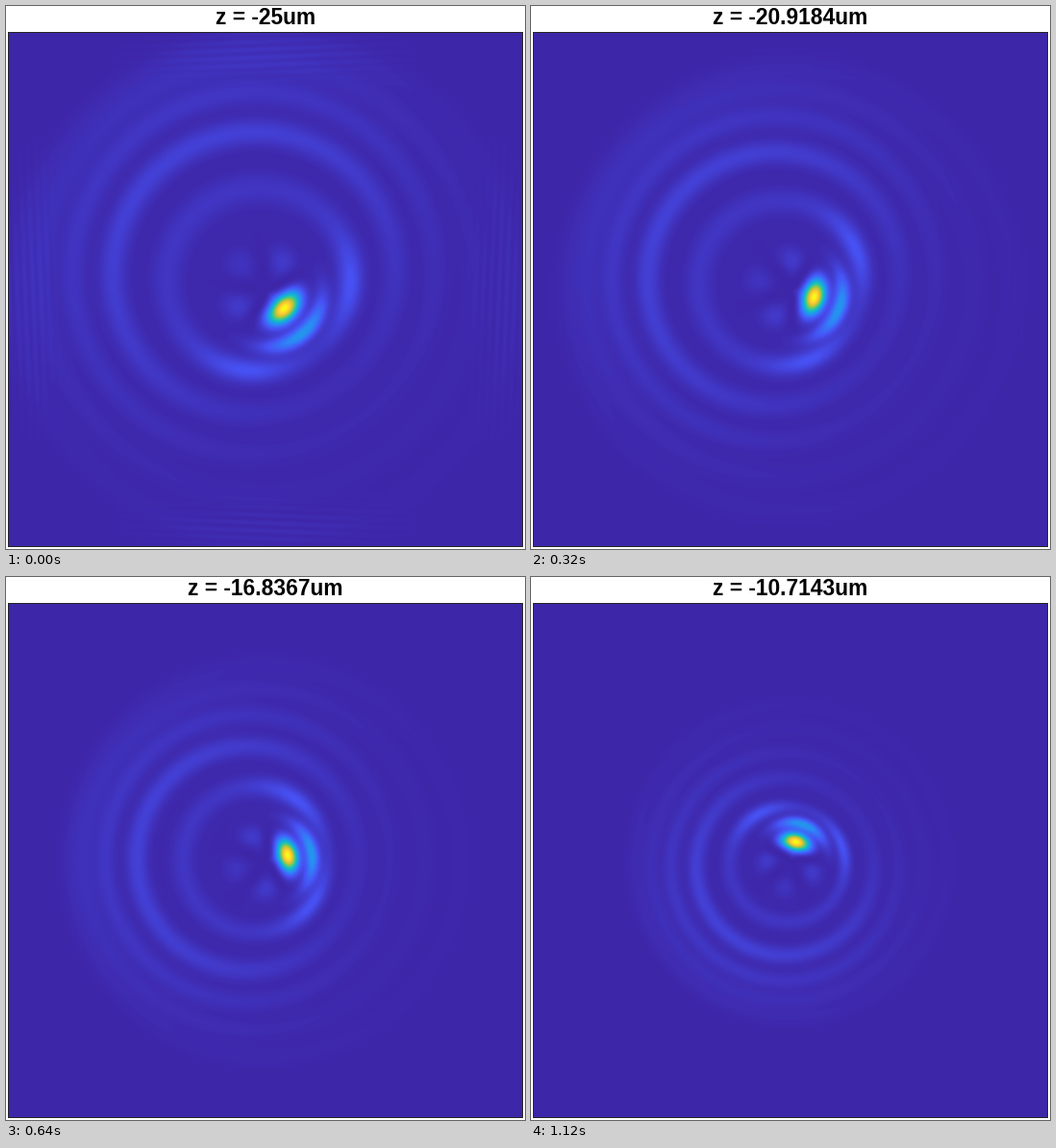
Recreate the animation shown at these times as a matplotlib script. Size 540 px wide and 565 px high, loop 1200 ms.

```python
import numpy as np
import matplotlib.pyplot as plt
from matplotlib.animation import FuncAnimation
from matplotlib.colors import LinearSegmentedColormap
from matplotlib.patches import Rectangle

W, H, DPI = 540, 565, 100
FRAMES, STEP_MS = 15, 80
LEFT, TOP, SIDE = 3, 28, 534
CHARGES = 5
RINGS = 5

PARULA = LinearSegmentedColormap.from_list("parula", [
    (.2422, .1504, .6603), (.2810, .3228, .9579), (.1786, .5289, .9682),
    (.0689, .6948, .8394), (.2161, .7843, .5923), (.6720, .7793, .2227),
    (.9970, .7659, .2199), (.9769, .9839, .0805)])

# Offsets from the optical axis, Y up
px, py = np.meshgrid(np.arange(SIDE) + LEFT, np.arange(SIDE) + TOP)
X, Y = px - 270, 295 - py
R, PHI = np.hypot(X, Y), np.arctan2(Y, X)


def bell(d, sigma):
    return np.exp(-0.5 * (d / sigma) ** 2)


def mix(a, b, t):
    return a + (b - a) * t


def angle_from(a):
    return (PHI - a + np.pi) % (2 * np.pi) - np.pi


def vortex_sum(phi):
    """Intensity around the axis of equal waves with consecutive charges."""
    waves = sum(np.exp(1j * n * phi) for n in range(CHARGES))
    return np.abs(waves / CHARGES) ** 2


def edge_fringes(k):
    """Faint wrap-around stripes along the four borders."""
    out = np.zeros(R.shape)
    for across, along in ((X, Y), (Y, X)):
        depth = SIDE / 2 - np.abs(across)
        wave = np.cos(np.pi * (depth + .04 * along) / 8.2) ** 2
        out += wave * bell(depth - 22, 17) * bell(along, 80)
    return .022 * bell(k, 1.9) * out


def intensity(k):
    t = k / (FRAMES - 1)
    turn = np.radians(mix(-45, 76, .8 * t + .2 * t ** 3))
    phi = angle_from(turn)

    # Main lobe with its weak side petals
    spread = 1 + .18 * (1 - np.cos(phi))
    img = vortex_sum(phi) * bell(R - mix(27, 20.5, t) * spread,
                                 mix(8.4, 6.2, t) * spread)

    # Crescent outside the lobe
    arc = np.degrees(angle_from(turn - np.radians(5)))
    img += .33 * bell(R - mix(59, 40, t), mix(6, 4.3, t)) * bell(arc, 29)

    # Off-centre rings, brighter on the side away from the lobe
    lag = np.radians(mix(10, 33, t))
    away = np.cos(angle_from(turn + np.pi - lag))
    for n in range(RINGS):
        shift = (23 - 14 * t ** 3) * np.sin(np.pi * (n + 1) / RINGS)
        radius = mix(95, 60, t) * (n + 1) ** .62 + shift * away
        if n == 0:
            amp = .045 + .09 * bell(np.abs(arc) - 54, 21)
            width = mix(9, 5, t) * (1.1 + .2 * away)
        else:
            amp = .085 * .6 ** (n - 1) * (.62 + .38 * away)
            width = mix(10, 6.5, t)
        img += amp * bell(R - radius, width)

    img += .010 * bell(R, mix(130, 75, t)) * (1 - bell(R, 30))
    img += edge_fringes(k)
    return img / img.max()


fig = plt.figure(figsize=(W / DPI, H / DPI), dpi=DPI, facecolor="white")
ax = fig.add_axes([0, 0, 1, 1])
ax.axis("off")

# The one-pixel frame is a dark square showing around the field
ax.add_patch(Rectangle((LEFT - 1, TOP - 1), SIDE + 2, SIDE + 2, lw=0,
                       fc=(.15, .15, .15), antialiased=False, zorder=0))
field = ax.imshow(intensity(0), cmap=PARULA, vmin=0, vmax=1, aspect="auto",
                  interpolation="nearest", zorder=1,
                  extent=(LEFT, LEFT + SIDE, TOP + SIDE, TOP))
ax.set_xlim(0, W)
ax.set_ylim(H, 0)
title = ax.text(269.7, 19.2, "", ha="center", va="baseline", color="black",
                family="Liberation Sans", weight="bold", size=22.8 * 72 / DPI)


def draw(k):
    title.set_text(f"z = {-25 + 50 * k / 49:.6g}um")
    field.set_data(intensity(k))
    return field, title


anim = FuncAnimation(fig, draw, frames=FRAMES, interval=STEP_MS,
                     repeat=True, repeat_delay=0)
plt.show()
```
